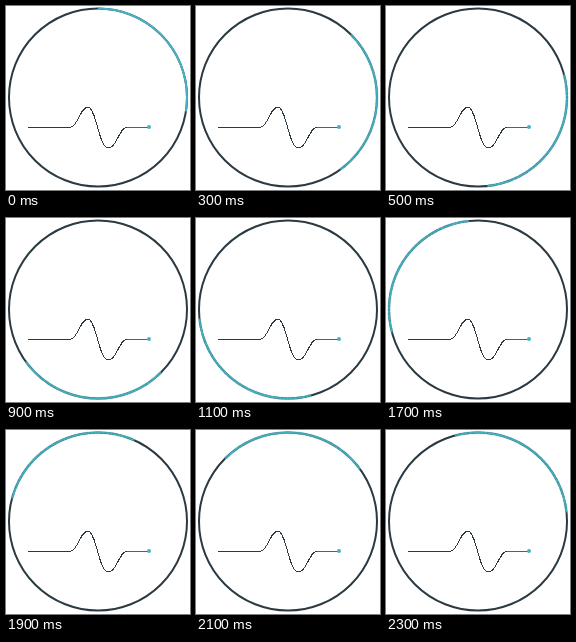
An HTML page for the animation above (2400 ms loop, 184 by 184 pixels).

```html
<!DOCTYPE html>
<html lang="en">
<head>
<meta charset="utf-8">
<title>Pulse loader</title>
<style>
  html, body {
    margin: 0;
    width: 100%;
    height: 100%;
    overflow: hidden;
    background: #fff;
  }
  svg {
    display: block;
    width: 184px;
    height: 184px;
    fill: none;
    --ink: #2b3a42;
    --accent: #45b3c4;
  }
  .ring { stroke-width: 2; }
  .track, .wave { stroke: var(--ink); }
  .wave { shape-rendering: crispEdges; }
  .arc {
    stroke: var(--accent);
    stroke-dasharray: 99 261;
    transform-origin: 92px 91.5px;
    animation: spin 2400ms steps(24) infinite;
  }
  .tail { stroke: #3a6a77; }
  .dot { fill: var(--accent); }
  @keyframes spin {
    from { transform: rotate(0deg); }
    to { transform: rotate(360deg); }
  }
</style>
</head>
<body>
<svg viewBox="0 0 184 184">
  <!-- the track leaves a gap under the arc, so both turn together -->
  <circle class="ring track" cx="92" cy="91.5" r="89"/>
  <!-- starts at twelve o'clock, measured in degrees -->
  <path class="ring arc" pathLength="360" d="M92 2.5a89 89 0 0 1 0 178a89 89 0 0 1 0-178"/>
  <path class="wave" d="M22 121.5H63C72 121.5 74 101 82 101S93 142 102 142S113 121.5 121 121.5"/>
  <path class="tail" d="M121 121.5H142"/>
  <circle class="dot" cx="143" cy="121" r="2"/>
</svg>
</body>
</html>
```
